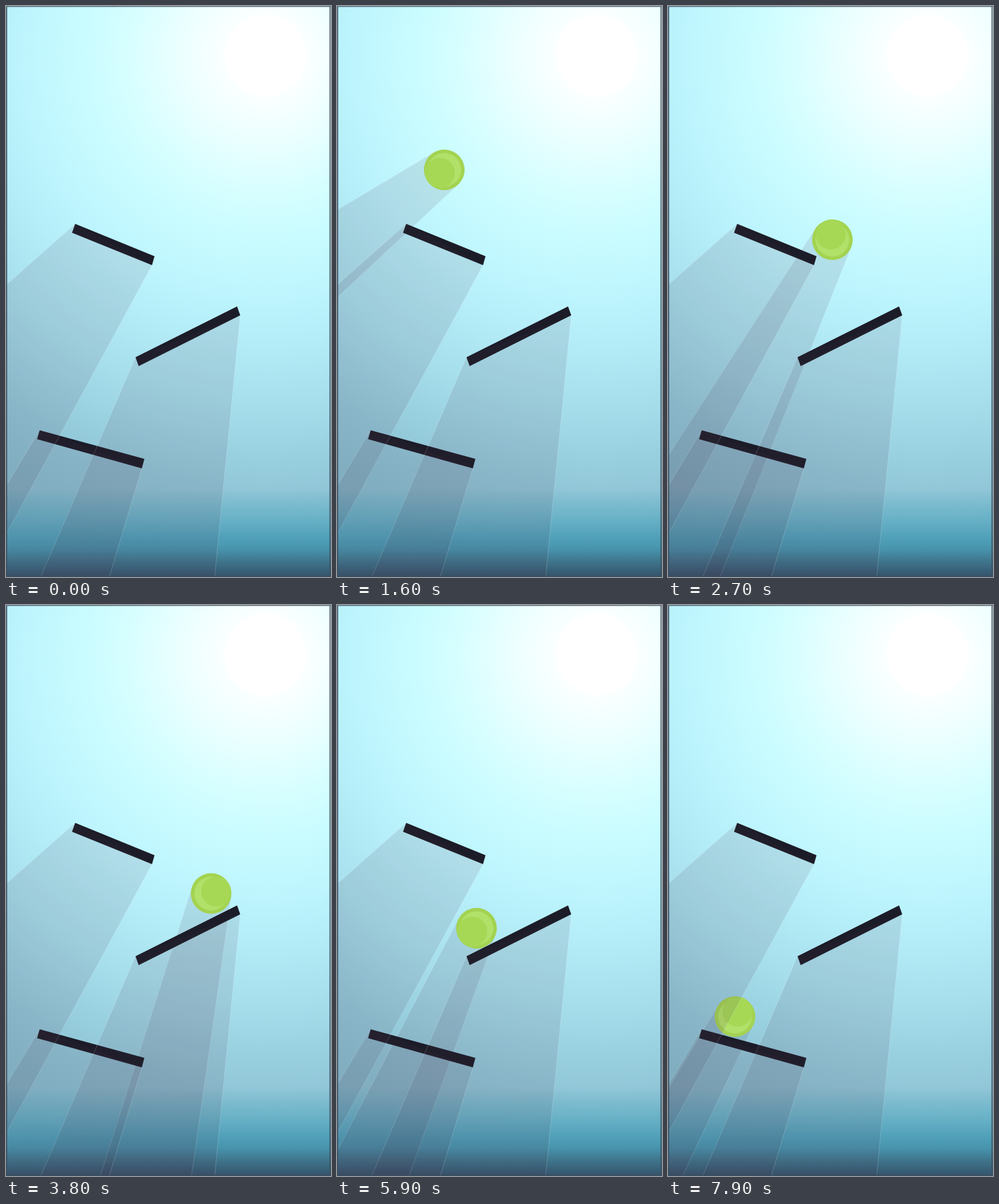
Write an HTML page that moves like this. It is 512 px wide and 899 px high and loops after 8000 ms.

```html
<!DOCTYPE html>
<html lang="en">
<head>
<meta charset="utf-8">
<title>Rolling ball</title>
<style>
  html, body { margin: 0; width: 100%; height: 100%; overflow: hidden; }
  svg { display: block; width: 100%; height: 100%; }
  .fill { fill: rgb(70, 50, 70); fill-opacity: .115; }
  .edge { fill: none; stroke: #e8ffff; stroke-opacity: .2; }
</style>
</head>
<body>
<svg viewBox="0 0 512 899" preserveAspectRatio="none">
  <defs>
    <radialGradient id="sky" gradientUnits="userSpaceOnUse" cx="409" cy="78" r="850">
      <stop offset=".075" stop-color="#fbffff"/>
      <stop offset=".16" stop-color="#ebffff"/>
      <stop offset=".26" stop-color="#d6feff"/>
      <stop offset=".34" stop-color="#c9fcff"/>
      <stop offset=".47" stop-color="#bbf3fd"/>
      <stop offset=".65" stop-color="#a6deec"/>
      <stop offset=".82" stop-color="#8fc5d6"/>
      <stop offset="1" stop-color="#80b8ca"/>
    </radialGradient>
    <linearGradient id="water" gradientUnits="userSpaceOnUse" x1="0" y1="760" x2="0" y2="899">
      <stop offset="0" stop-color="#55a8c0" stop-opacity="0"/>
      <stop offset=".3" stop-color="#55a8c0" stop-opacity=".55"/>
      <stop offset=".55" stop-color="#4e9fb8" stop-opacity=".95"/>
      <stop offset=".68" stop-color="#4894ad"/>
      <stop offset=".82" stop-color="#3f768d"/>
      <stop offset="1" stop-color="#34536a"/>
    </linearGradient>
  </defs>
  <rect width="512" height="899" fill="url(#sky)"/>
  <rect y="760" width="512" height="139" fill="url(#water)"/>
  <circle cx="409" cy="78" r="64" fill="#fff"/>
  <g id="ballShadow"></g>
  <g id="ball">
    <circle r="32" fill="#a3d351"/>
    <circle r="26.5" fill="#b1e168"/>
    <circle cx="8.5" r="23.5" fill="#a6d856"/>
  </g>
  <g id="bars" fill="#1c1c28"></g>
  <g id="barShadows"></g>
  <path d="M0 .5H512M1 0V899M510.5 0V899M0 898H512" fill="none" stroke="#3d4f60" stroke-opacity=".8" stroke-width="2"/>
</svg>
<script>
const LOOP = 8000, STEP = 100;
const SUN = [409, 78], RADIUS = 32, HALF_G = 86.6;
const BARS = [
  [[109, 343], [234, 394], [230, 408], [104, 357]],
  [[204, 553], [364, 473], [369, 487], [209, 567]],
  [[53, 668], [218, 713], [214, 728], [49, 682]]
];
const byId = id => document.getElementById(id);
const ball = byId("ball"), ballShadow = byId("ballShadow");

// Shadow wedge behind two silhouette points, as seen from the sun.
function shadow(a, b) {
  const far = ([x, y]) => [SUN[0] + (x - SUN[0]) * 12, SUN[1] + (y - SUN[1]) * 12];
  const fa = far(a), fb = far(b);
  return `<path class="fill" d="M${a}L${fa}L${fb}L${b}Z"/>` +
         `<path class="edge" d="M${a}L${fa}M${b}L${fb}"/>`;
}

function barShadow(points) {
  const angle = ([x, y]) => Math.atan2(y - SUN[1], x - SUN[0]);
  const sorted = [...points].sort((p, q) => angle(p) - angle(q));
  return shadow(sorted[0], sorted[3]);
}

function discShadow(x, y) {
  const dx = SUN[0] - x, dy = SUN[1] - y;
  const toSun = Math.atan2(dy, dx), spread = Math.acos(RADIUS / Math.hypot(dx, dy));
  const rim = a => [x + RADIUS * Math.cos(a), y + RADIUS * Math.sin(a)];
  return shadow(rim(toSun - spread), rim(toSun + spread));
}

const hop = (s, v) => Math.max(0, v * s - HALF_G * s * s);
const onFirst = x => 332.9 + .392 * (x - 169);
const onSecond = x => 516.8 - .5 * (x - 204);
const onThird = x => 633.7 + .2727 * (x - 53);

// Ball position and angle (degrees) at t seconds.
function pose(t) {
  if (t < 1.823) return [169, -31 + 42 * t + HALF_G * t * t, 145];
  if (t < 2.7) {
    const s = t - 1.823, x = 169 + 102.6 * s;
    return [x, onFirst(x) - hop(s, 64), 145 + 123 * s];
  }
  if (t < 3.4) {
    const s = t - 2.7;
    return [259 + 95.7 * s, 368 + 65 * s + HALF_G * s * s, 253 + 124 * s];
  }
  if (t <= 6.3) {
    const s = t - 3.4, d = 17.9 * s * s - .36 * s ** 3, x = 326 - d;
    return [x, onSecond(x) - hop(s, 42), 343 - d * 1.9];
  }
  if (t < 7.23) {
    const s = t - 6.3;
    return [184.2 - 79 * s, 526.7 + 51.4 * s + HALF_G * s * s, 74 - 150 * s];
  }
  const s = t - 7.23, x = 110.7 - 10.5 * Math.min(s, .49);
  return [x, onThird(x) - hop(s, 42), -65];
}

function render(ms) {
  const t = Math.floor((ms % LOOP) / STEP) * STEP / 1000;
  const [x, y, angle] = pose(t);
  ball.setAttribute("transform", `translate(${x} ${y}) rotate(${angle})`);
  ballShadow.innerHTML = discShadow(x, y);
}

byId("bars").innerHTML = BARS.map(p => `<polygon points="${p.join(" ")}"/>`).join("");
byId("barShadows").innerHTML = BARS.map(barShadow).join("");

const start = performance.now();
function tick() {
  render(performance.now() - start);
  requestAnimationFrame(tick);
}
tick();
</script>
</body>
</html>
```
